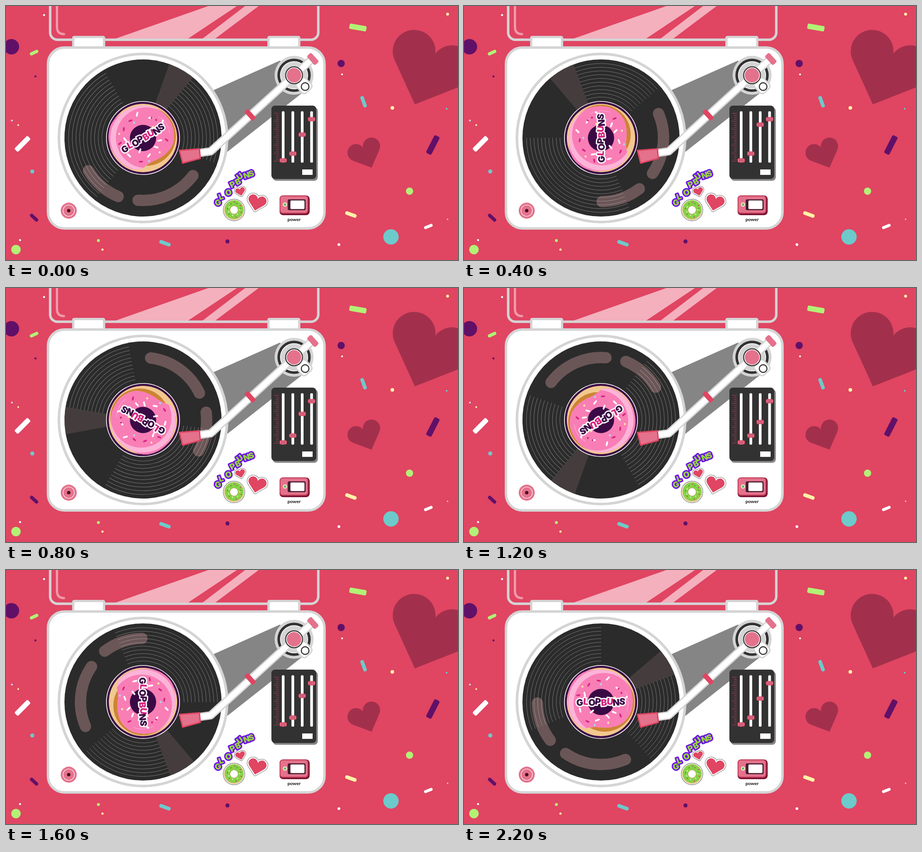
These frames come from a looping animation (998 by 561 pixels, 2.4 s). An HTML page with a canvas:

```html
<!DOCTYPE html>
<html lang="en">
<head>
<meta charset="utf-8">
<title>Turntable</title>
<style>
html, body { margin: 0; width: 100%; height: 100%; overflow: hidden; background: #e04562; }
canvas { display: block; }
</style>
</head>
<body>
<canvas id="stage" width="998" height="561"></canvas>
<script>
const ctx = document.getElementById('stage').getContext('2d');
const RAD = Math.PI / 180;
const STEP = 200, STEPS = 12;
const RED = '#e04562', PINK = '#e4728c', GREY = '#d5d4d5', DARK = '#2b2b2b', CASE = '#333233';
const PLUM = '#3a0a45', PURPLE = '#611068', GREEN = '#b2f175', TEAL = '#6ccaca';
const CREAM = '#fdf3a6', MAGENTA = '#d5247f', WHITE = '#fff', SHADE = '#858585';
const BRAND = 'GLOPBUNS';
// height of the moving slider at each beat
const FADER = [284, 273, 262, 270, 278, 287, 296, 287, 278, 275.5, 273, 284];

function paint(fill, line, width) {
  if (fill) { ctx.fillStyle = fill; ctx.fill(); }
  if (line) { ctx.strokeStyle = line; ctx.lineWidth = width; ctx.stroke(); }
}
function disc(x, y, r, fill, line, width) {
  ctx.beginPath();
  ctx.arc(x, y, r, 0, 7);
  paint(fill, line, width);
}
function box(x, y, w, h, r, fill, line, width) {
  ctx.beginPath();
  ctx.roundRect(x, y, w, h, r);
  paint(fill, line, width);
}
function poly(points, fill, line, width) {
  ctx.beginPath();
  points.forEach(p => ctx.lineTo(p[0], p[1]));
  ctx.closePath();
  paint(fill, line, width);
}
function at(x, y, deg, draw) {
  ctx.save();
  ctx.translate(x, y);
  ctx.rotate(deg * RAD);
  draw();
  ctx.restore();
}
function bar(x, y, w, h, r, deg, fill, line, width) {
  at(x, y, deg, () => box(-w / 2, -h / 2, w, h, r, fill, line, width));
}
function pill(x, y, w, h, deg, fill) {
  bar(x, y, w, h, Math.min(h / 2, 3.5), deg, fill);
}
// notch sits at x,y and the tip is one size below it
function heart(x, y, size, deg, fill, sticker) {
  at(x, y, deg, () => {
    ctx.beginPath();
    ctx.moveTo(0, size);
    ctx.arc(-.375 * size, .107 * size, .39 * size, 132.8 * RAD, 344 * RAD);
    ctx.arc(.375 * size, .107 * size, .39 * size, 196 * RAD, 407.2 * RAD);
    ctx.closePath();
    if (sticker) {
      paint(null, '#777', sticker + 2);
      paint(null, WHITE, sticker);
    }
    paint(fill);
  });
}
// letters: [char, x, y, degrees, colour]
function lettering(letters, size, line, width) {
  ctx.font = `900 ${size}px Inter, "Open Sans", sans-serif`;
  ctx.textAlign = 'center';
  ctx.textBaseline = 'alphabetic';
  const base = size * .36;
  for (const [c, x, y, deg] of letters) at(x, y, deg, () => {
    ctx.strokeStyle = line;
    ctx.lineWidth = width;
    ctx.strokeText(c, 0, base);
  });
  for (const [c, x, y, deg, fill] of letters) at(x, y, deg, () => {
    ctx.fillStyle = fill;
    ctx.fillText(c, 0, base);
  });
}
function smooth(points) {
  const n = points.length;
  const mid = i => {
    const a = points[i % n], b = points[(i + 1) % n];
    return [(a[0] + b[0]) / 2, (a[1] + b[1]) / 2];
  };
  ctx.beginPath();
  ctx.moveTo(...mid(0));
  for (let i = 1; i <= n; i++) ctx.quadraticCurveTo(...points[i % n], ...mid(i));
  ctx.closePath();
}

function confetti() {
  heart(948, 105, 121, 22, '#a2304c');
  heart(788, 312, 49, -23, '#a2304c');
  [[12, 90, 17, PURPLE], [740, 127, 8, PURPLE], [489, 520, 4.5, PURPLE], [65, 155.5, 2.3, PURPLE],
   [22, 538, 10.5, GREEN], [891, 409, 8, GREEN], [204, 518, 3.2, GREEN],
   [850, 510, 17, TEAL], [58, 365.5, 4.5, TEAL], [973, 227, 2, TEAL],
   [84, 20, 2.3, WHITE], [742, 151, 2.1, WHITE], [31, 517, 2.3, WHITE], [735, 527, 3, WHITE],
   [975, 18, 3.2, CREAM], [853, 225, 4, CREAM], [27, 263, 2, CREAM], [213, 538, 2.5, CREAM],
   [13, 253, 2.1, '#bfe8f0'], [975, 471, 1.5, '#bfe8f0']].forEach(c => disc(...c));
  [[777, 47.5, 38, 12, 10, GREEN], [62, 103, 20, 7, -25, GREEN], [36.5, 304.5, 41, 11, -45, WHITE],
   [62, 467.5, 22, 7.5, 43, PURPLE], [351, 524, 26, 8, 20, TEAL], [761.5, 460.5, 26, 8, 20, CREAM],
   [932.5, 487, 20, 6.5, -22, WHITE], [942.5, 307, 44, 13, -63, PURPLE],
   [789.5, 211.5, 26, 8, 70, TEAL]].forEach(p => pill(...p));
}

function lid() {
  box(97.5, -40, 592, 114.5, 16, RED, GREY, 5.5);
  poly([[447, 0], [510, 0], [402, 72], [242, 72]], '#f4b0bd');
  poly([[528, 0], [558, 0], [462, 72], [434, 72]], '#f4b0bd');
  ctx.beginPath();
  ctx.moveTo(112.5, -5);
  ctx.lineTo(112.5, 46);
  ctx.quadraticCurveTo(112.5, 62, 128, 62);
  paint(null, '#f09aaa', 5);
  box(148.5, 68.5, 68, 40, 2, WHITE, GREY, 5);
  box(579.5, 68.5, 68, 40, 2, WHITE, GREY, 5);
}

function pinkRing() {
  disc(0, 0, 75.5, '#f1c88f');
  disc(8, 0, 65.5, '#cd8433');
  ctx.save();
  smooth([[-12, -72], [23, -70], [49, -54], [68, -28], [71, 6], [64, 29], [46, 50], [14, 58], [-16, 54],
    [-40, 60], [-62, 42], [-74, 8], [-72, -29], [-57, -53], [-39, -67]]);
  paint('#f97eb6');
  ctx.clip();
  disc(0, 0, 72, '#fcb4d9');
  disc(6.5, 3, 67, '#f97eb6');
  ctx.beginPath();
  ctx.arc(6, 2, 54, -.5, .35);
  paint(null, '#fcb4d9', 1);
  ctx.restore();
  disc(0, 0, 29, PLUM);
  [[15, -52, -45], [-36, -17, 80], [-20, 21, -40], [29, 23, 20], [15, 32, 45], [-8, 40, -20],
   [55, -9, -50], [-46, 18, 75], [37, -30, 30]].forEach(p => pill(p[0], p[1], 11, 3.8, p[2], WHITE));
  [[-5, -47, 10], [-50, -15, -10], [-27, -38, -55], [43, 30, 70], [-30, 43, 25]]
    .forEach(p => pill(p[0], p[1], 9, 3.6, p[2], MAGENTA));
  [[39, -29, MAGENTA], [45, -20, MAGENTA], [0, -39, '#a9dcf5'], [-14, 51, '#a9dcf5'], [40, 10, '#a9dcf5'],
   [16, 46, CREAM], [-41, -34, CREAM], [31, -10, CREAM]].forEach(d => disc(d[0], d[1], 2.2, d[2]));
  const tones = [PLUM, MAGENTA, PLUM, PLUM, MAGENTA, MAGENTA, PLUM, PLUM];
  lettering([...BRAND].map((c, i) =>
    [c, (i - 3.5) * 13.4, i % 2 ? -1 : 1, i % 2 ? 5 : -4, tones[i]]), 20, WHITE, 5.5);
}

function record(turn) {
  disc(302.5, 291.5, 185.7, WHITE, GREY, 5.8);
  at(302.5, 291.5, turn, () => {
    disc(0, 0, 173.5, DARK);
    for (const [from, to] of [[158, 270], [-20.5, 49]]) {
      for (let i = 0; i < 10; i++) {
        ctx.beginPath();
        ctx.arc(0, 0, 164.5 - i * 8.2, from * RAD, to * RAD);
        paint(null, '#757575', 1);
      }
    }
    ctx.beginPath();
    ctx.moveTo(0, 0);
    ctx.arc(0, 0, 173.5, -40.5 * RAD, -20.5 * RAD);
    paint('rgba(255,187,190,.12)');
    for (const [from, to, r] of [[143, 179, 140.5], [67, 124.5, 138]]) {
      ctx.beginPath();
      ctx.arc(0, 0, r, from * RAD, to * RAD);
      paint(null, 'rgba(255,187,190,.3)', 25);
    }
    disc(0, 0, 80.8, PLUM, WHITE, 1.6);
    pinkRing();
  });
}

function mixer(y) {
  box(589, 224, 99.5, 162, 8, SHADE);
  box(586, 220, 99, 162, 8, CASE);
  for (let i = 0; i < 25; i++) {
    const w = i % 4 ? 6 : 10;
    ctx.fillStyle = '#b83a52';
    ctx.fillRect(602 - w, 236.5 + i * 4.4, w, 1);
  }
  [[612, 341], [633.3, 326], [654, y], [674.7, 250]].forEach(([x, h]) => {
    box(x - 3, 232.5, 6, 113.5, 2, WHITE);
    box(x - 7.5, h - 4, 15, 8, 3, PINK, '#d84863', 1.3);
    ctx.fillStyle = '#9b2c45';
    for (const d of [-3.5, 0, 3.5]) ctx.fillRect(x + d - .5, h - 2.5, 1, 5);
  });
  box(654, 361, 23, 12, 0, WHITE);
}

function arm() {
  disc(636, 153, 43, GREY);
  disc(636, 153, 36.8, CASE);
  disc(636, 153, 31, WHITE);
  disc(636, 153, 29.5, GREY);
  bar(658, 176, 30, 28, 7, 47, WHITE, GREY, 3);
  const tube = () => {
    ctx.beginPath();
    ctx.moveTo(675, 118);
    ctx.lineTo(452, 321);
    ctx.lineTo(424, 325);
  };
  tube();
  paint(null, GREY, 18);
  tube();
  paint(null, WHITE, 12.5);
  disc(660.5, 178, 8.5, WHITE, CASE, 2.4);
  disc(636, 153, 18.6, WHITE, CASE, 2.2);
  disc(636, 153, 16, PINK);
  bar(539, 240.5, 27, 11, 3, 48, RED);
  bar(677.5, 117, 27, 13, 4, 48, PINK);
  poly([[383, 319], [427, 315.5], [429, 336.5], [390, 347]], PINK, RED, 3);
}

function stickers() {
  const spots = [[468, 434, -28], [474.5, 421, -20], [491, 412, -25], [500, 394, -25],
    [512, 388, -28], [516, 376, -38], [531, 374, -18], [541.5, 370, -18]];
  lettering(spots.map((p, i) => [BRAND[i], ...p, '#98d445']), 18, '#6d14e2', 6);
  heart(516.5, 405.5, 14, -14, RED, 3.5);
  heart(556, 426, 26.5, 14, RED, 5);
  disc(503.5, 450.5, 23.8, WHITE, '#777', 1.2);
  disc(503.5, 450.5, 22, '#e9c083');
  disc(503.5, 449.5, 20.5, '#86d245');
  for (let i = 0; i < 14; i++) {
    const a = i * 2.4, r = 12.5 + i % 3 * 2.2;
    pill(503.5 + r * Math.cos(a), 450 + r * Math.sin(a), 3.5, 1.5, i * 70, [WHITE, '#477d25', MAGENTA][i % 3]);
  }
  disc(503.5, 450.5, 9, WHITE, '#c59b58', 1);
}

function controls() {
  disc(138.5, 452, 17.7, PINK);
  disc(138.5, 452, 12.5, null, WHITE, 1.2);
  disc(138.5, 452, 3.8, '#4a0d25');
  box(604, 418.5, 66.5, 43.5, 8, '#7b1534');
  box(605, 419.5, 61.5, 38, 6, PINK, '#c7405b', 2);
  box(622, 427, 39.5, 24, 3, '#4b1d31');
  box(628, 429.5, 31, 19, 2, WHITE);
  disc(616, 438.5, 4.6, WHITE);
  disc(616, 438.5, 3, '#6cc24a');
  ctx.font = '700 10.3px Lato, sans-serif';
  ctx.textAlign = 'center';
  ctx.textBaseline = 'alphabetic';
  ctx.fillStyle = '#111';
  ctx.fillText('power', 636, 475);
}

function draw(beat) {
  ctx.fillStyle = RED;
  ctx.fillRect(0, 0, 998, 561);
  ctx.lineCap = ctx.lineJoin = 'round';
  confetti();
  lid();
  box(92.7, 91.7, 610.5, 399.5, 36, WHITE, GREY, 5.5);
  poly([[440, 194], [605, 120.5], [668, 181], [480, 329]], SHADE);
  record(-30 * (beat + 1));
  mixer(FADER[beat]);
  arm();
  stickers();
  controls();
}

function tick() {
  draw(Math.floor(performance.now() / STEP) % STEPS);
  requestAnimationFrame(tick);
}
tick();
</script>
</body>
</html>
```
